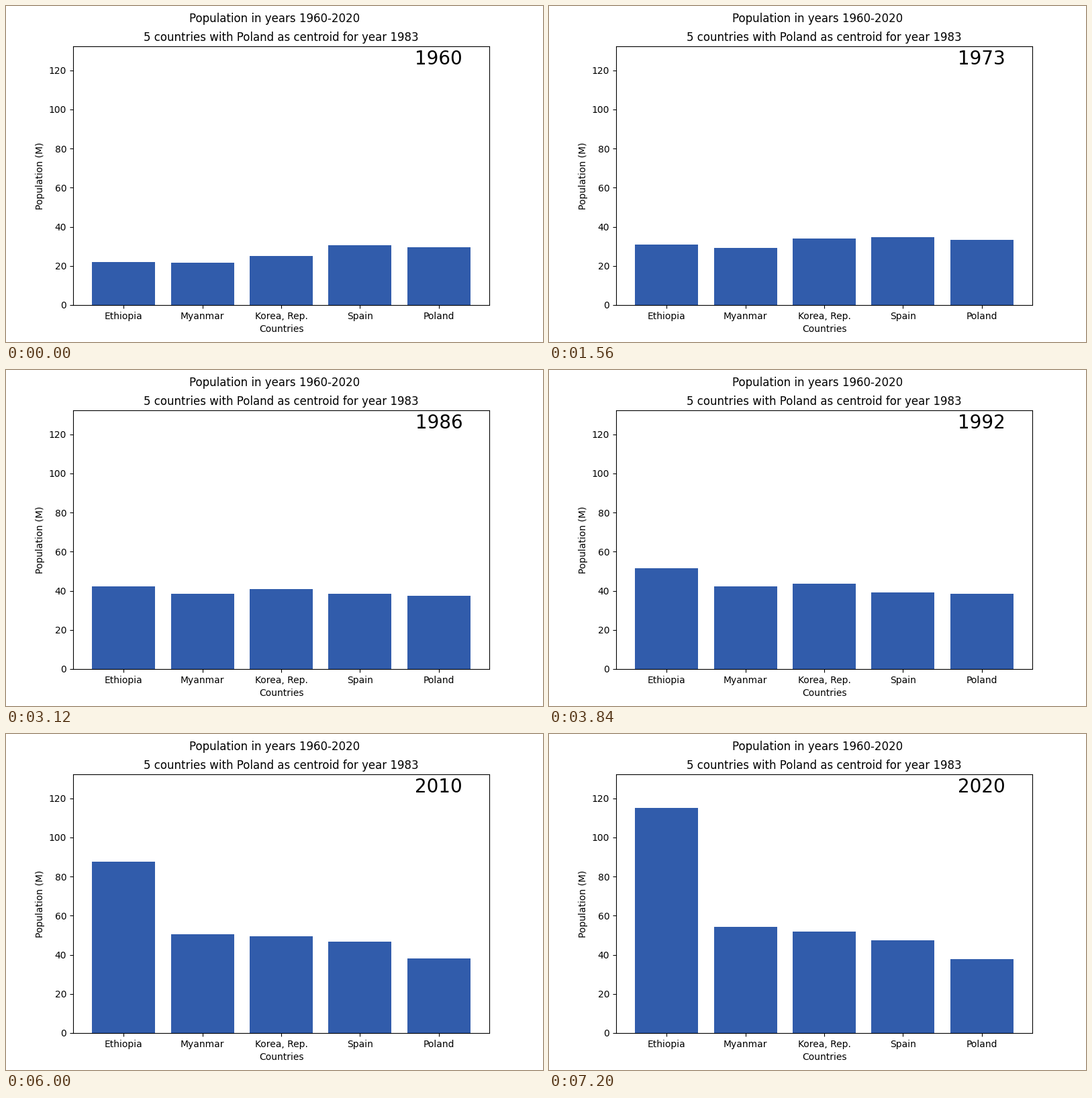
A matplotlib script for the animation above (7.32 s loop, 800x500 px).

```python
import matplotlib.pyplot as plt
import numpy as np
from matplotlib.animation import FuncAnimation

plt.rcParams["font.family"] = "DejaVu Sans"

FIRST, LAST = 1960, 2020

# Key years and the population in millions at each
KEY_YEARS = [1960, 1973, 1980, 1992, 2001, 2010, 2020]
POPULATION = {
    "Ethiopia": [22.15, 30.9, 35.1, 51.4, 68.0, 87.6, 115.0],
    "Myanmar": [21.74, 29.2, 34.2, 42.2, 47.35, 50.6, 54.4],
    "Korea, Rep.": [25.0, 34.1, 38.1, 43.7, 47.4, 49.55, 51.8],
    "Spain": [30.46, 34.85, 37.5, 39.15, 40.85, 46.6, 47.35],
    "Poland": [29.65, 33.35, 35.6, 38.4, 38.25, 38.05, 37.95],
}


def ease_through(x, y, at):
    """Cubic curve through the points that never overshoots them."""
    x, y = np.array(x, float), np.array(y)
    h = np.diff(x)
    d = np.diff(y) / h
    slope = np.concatenate(([d[0]], np.zeros(len(d) - 1), [d[-1]]))
    for i, (a, b) in enumerate(zip(d, d[1:]), start=1):
        if a * b > 0:
            slope[i] = 2 * a * b / (a + b)
    k = np.clip(np.searchsorted(x, at, side="right") - 1, 0, len(h) - 1)
    t = (at - x[k]) / h[k]
    bend = slope[k] * (1 - t) - slope[k + 1] * t
    return (y[k] * (1 + 2 * t) * (1 - t) ** 2
            + y[k + 1] * t ** 2 * (3 - 2 * t)
            + h[k] * t * (1 - t) * bend)


years = np.arange(FIRST, LAST + 1)
series = np.array([ease_through(KEY_YEARS, values, years)
                   for values in POPULATION.values()])

fig, ax = plt.subplots(figsize=(8, 5), dpi=100)
fig.suptitle(f"Population in years {FIRST}-{LAST}")
ax.set_title("5 countries with Poland as centroid for year 1983")
ax.set_xlabel("Countries")
ax.set_ylabel("Population (M)")
bars = ax.bar(list(POPULATION), series[:, 0], color="#315cab")
ax.set_ylim(0, series.max() * 1.15)
label = ax.text(4, 123, str(FIRST), fontsize=20, ha="center")


def update(frame):
    for bar, value in zip(bars, series[:, frame]):
        bar.set_height(value)
    label.set_text(str(years[frame]))
    return [*bars, label]


anim = FuncAnimation(fig, update, frames=len(years), interval=120,
                     repeat=True, repeat_delay=0)
plt.show()
```
